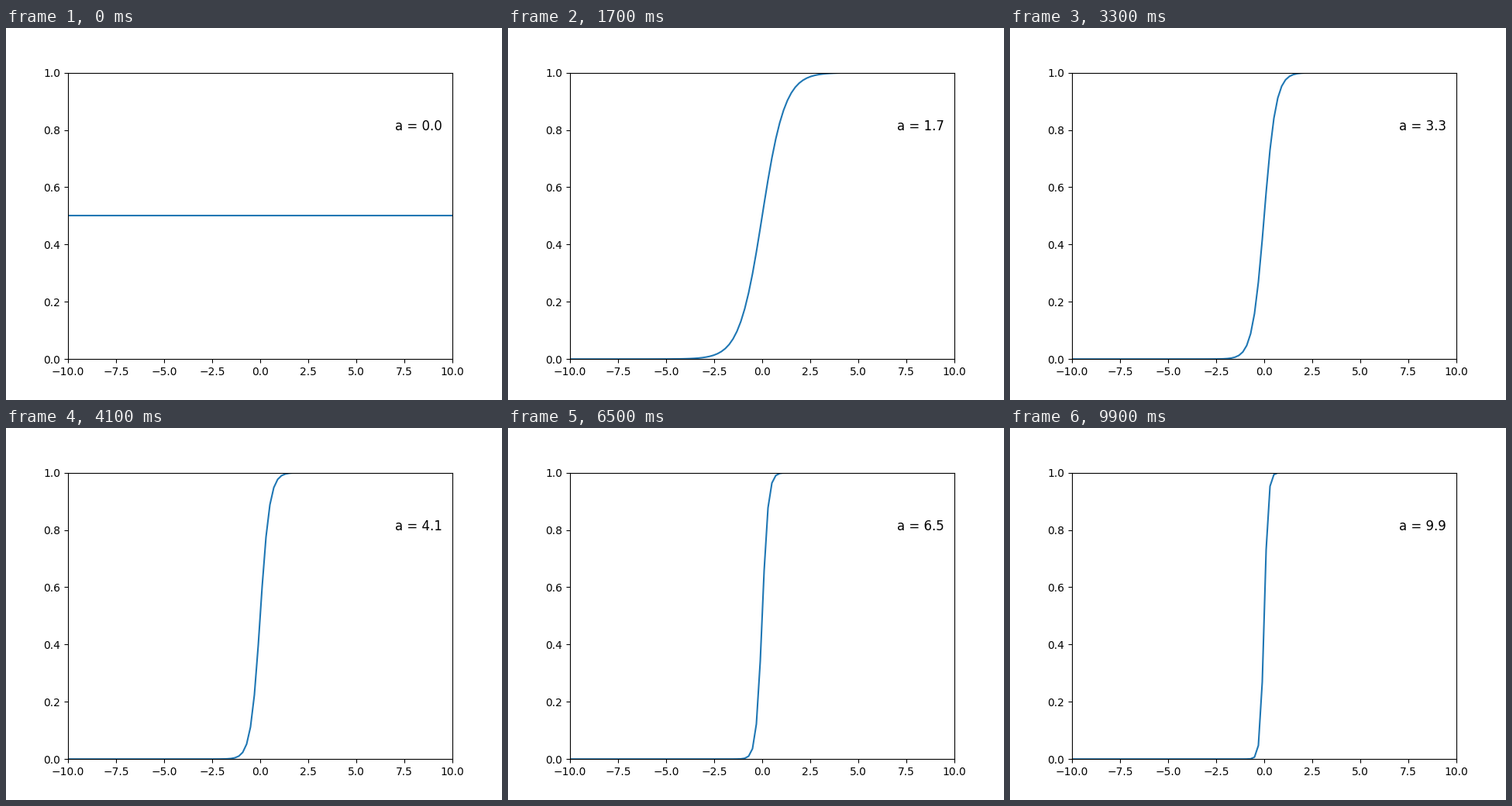
Recreate the animation shown at these times as a matplotlib script. Size 640x480 px, loop 10000 ms.

```python
import numpy as np
import matplotlib.pyplot as plt
from matplotlib.animation import FuncAnimation

FRAMES = 100
INTERVAL = 100  # ms

x = np.linspace(-10, 10, 100)


def sigmoid(x, a):
    return 1 / (1 + np.exp(-a * x))


fig, ax = plt.subplots(figsize=(6.4, 4.8), dpi=100)
ax.set_xlim(-10, 10)
ax.set_ylim(0, 1)
line, = ax.plot(x, sigmoid(x, 0))
label = ax.text(7, 0.8, "a = 0.0", fontsize=12)


def update(i):
    a = i / 10
    line.set_ydata(sigmoid(x, a))
    label.set_text(f"a = {a:.1f}")
    return line, label


anim = FuncAnimation(fig, update, frames=FRAMES, interval=INTERVAL,
                     repeat=True, repeat_delay=0)
plt.show()
```
